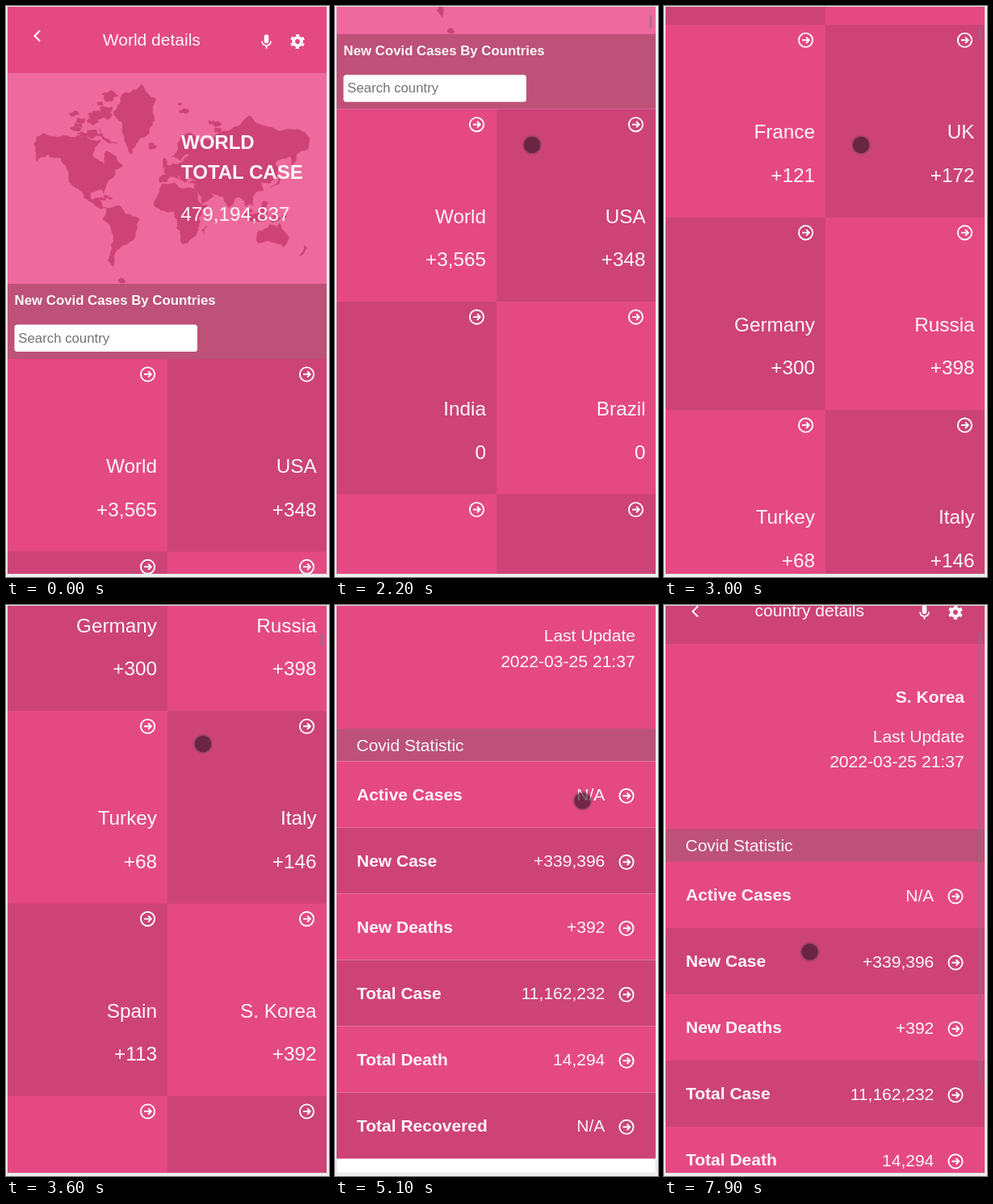
These frames come from a looping animation (400x707 px, 8 s). An HTML page:

```html
<!DOCTYPE html>
<html lang="en">
<head>
<meta charset="utf-8">
<title>Covid statistics app</title>
<style>
  html, body { margin: 0; width: 100%; height: 100%; overflow: hidden; background: #f0f0f0; }
  svg { display: block; width: 400px; height: 707px; }
  text { font-family: "Liberation Sans", Arial, sans-serif; fill: #fff; fill-opacity: .95; white-space: pre; }
  .b { font-weight: bold; }
</style>
</head>
<body>
<svg id="stage" viewBox="0 0 400 707"></svg>
<script>
const BRIGHT = '#e44982', DARK = '#cd4376', SEA = '#ee6a9c', BAND = '#bd5177';

// A few "lon lat" corners per land; the coast between them is roughened.
const LAND = {
  northAmerica: `-168 66,-156 71,-128 70,-95 68,-84 68,-94 59,-82 55,-79 52,-77 62,-65 59,-56 52,-66 49,-65 45,-76 36,
    -80 26,-84 30,-97 27,-96 18,-87 21,-83 10,-77 8,-97 16,-105 20,-117 33,-124 40,-125 48,-135 58,-150 60,-164 55,-165 61`,
  greenland: '-68 78,-55 82,-33 83.5,-14 81,-22 71,-40 65,-45 60,-53 67,-57 75',
  baffin: '-85 73,-63 66,-76 67',
  southAmerica: '-77 8,-62 11,-50 0,-35 -6,-40 -21,-57 -37,-67 -47,-68 -55,-75 -50,-71 -18,-81 -5',
  africa: '-6 36,10 37,20 31,33 31,43 12,51 12,40 -4,40 -15,31 -29,19 -35,12 -17,9 4,-8 5,-17 14,-10 30',
  madagascar: '50 -14,47 -25,44 -20',
  europe: `-9 37,-9 43,-1 45,-4 48.5,8 54,20 55,29 60,21 61,25 65,17 56,6 59,14 67,26 71,41 67,46 68,46 42,28 42,
    22 37,13 45,16 39,4 43,0 38`,
  britain: '-5 50,1 52,-4 58',
  asia: `45 68,72 72,104 77,140 72,180 69,177 63,163 60,157 51,155 59,137 54,140 48,129 36,119 38,122 30,108 21,109 11,
    101 12,103 2,98 16,88 21,78 8,72 20,57 26,50 29,59 22,44 13,35 29,36 36,27 37,41 42`,
  japan: '131 32,141 36,143 44',
  australia: '114 -22,130 -12,139 -17,142 -11,153 -26,147 -38,138 -34,130 -32,115 -34',
  newZealand: '173 -36,177 -39,167 -46'
};

const CARDS = [
  ['World', '+3,565'], ['USA', '+348'], ['India', '0'], ['Brazil', '0'],
  ['France', '+121'], ['UK', '+172'], ['Germany', '+300'], ['Russia', '+398'],
  ['Turkey', '+68'], ['Italy', '+146'], ['Spain', '+113'], ['S. Korea', '+392'],
  ['Argentina', '0'], ['Vietnam', '0'], ['', ''], ['', '']
];
const STATS = [
  ['Active Cases', 'N/A'], ['New Case', '+339,396'], ['New Deaths', '+392'],
  ['Total Case', '11,162,232'], ['Total Death', '14,294'], ['Total Recovered', 'N/A']
];

// Eased moves: start ms, duration ms, then how far to scroll or where to point.
const LIST_FLICKS = [[1200, 500, 235.3], [1990, 560, 233.9], [2700, 530, 704], [3400, 600, 332.4]];
const DETAIL_FLICKS = [[7600, 300, -124.5]];
const POINTER_MOVES = [
  [500, 0, 44, 104], [500, 200, 316, 138], [700, 200, 244, 172],
  [3900, 200, 284, 238], [4100, 200, 303, 246],
  [5000, 200, 310, 239], [5200, 300, 284, 292], [5700, 200, 264, 207],
  [6000, 200, 385, 200], [6200, 300, 223, 163], [6500, 100, 147, 166], [6600, 200, 247, 178],
  [7100, 400, 180.5, 429.5]
];

const clamp = v => Math.min(1, Math.max(0, v));
const ease = k => k * k * (3 - 2 * k);

let seed = 7;
const random = () => (seed = seed * 16807 % 2147483647) / 2147483647;

const rect = (x, y, w, h, fill, more = '') => `<rect x="${x}" y="${y}" width="${w}" height="${h}" fill="${fill}" ${more}/>`;
const text = (x, y, size, str, anchor = 'start', cls = '') =>
  `<text x="${x}" y="${y}" font-size="${size}" text-anchor="${anchor}" class="${cls}">${str}</text>`;
const line = (d, w = 2) => `<path d="${d}" fill="none" stroke="#fff" stroke-width="${w}"/>`;
const arrow = (x, y) => `<g transform="translate(${x} ${y})">
  <circle r="8.6" fill="none" stroke="#fff" stroke-width="1.9"/>${line('M-4.5 0H4M.6 -3.7L4.3 0L.6 3.7', 1.9)}</g>`;

const project = (lon, lat) => [199.5 + .98 * lon, 258 - 56.2 * Math.asinh(Math.tan(lat * Math.PI / 180))];

// Midpoint displacement between two points; returns the points after a.
function coast(a, b) {
  const dx = b[0] - a[0], dy = b[1] - a[1];
  if (Math.hypot(dx, dy) < 4) return [b];
  const k = (random() - .5) * .36;
  const mid = [(a[0] + b[0]) / 2 - dy * k, (a[1] + b[1]) / 2 + dx * k];
  return [...coast(a, mid), ...coast(mid, b)];
}
const outline = pts => 'M' + pts.flatMap((p, i) => coast(p, pts[(i + 1) % pts.length]))
  .map(p => p.map(v => v.toFixed(1)).join(' ')).join('L') + 'Z';
const parse = shape => shape.split(',').map(pair => project(...pair.trim().split(' ').map(Number)));

// Small islands spread over a box of longitudes and latitudes.
function islands(count, west, east, south, north, size) {
  return Array.from({ length: count }, () => {
    const [x, y] = project(west + random() * (east - west), south + random() * (north - south));
    const r = size * (.5 + random()), turn = random() * 6;
    return outline([0, 1, 2, 3].map(i => [x + r * 1.4 * Math.cos(turn + i * 1.57), y + r * .8 * Math.sin(turn + i * 1.57)]));
  }).join('');
}

function worldMap() {
  const d = Object.values(LAND).map(shape => outline(parse(shape))).join('') +
    islands(16, -118, -82, 69.5, 78, 4) + islands(9, -90, -68, 77, 82, 6) +
    islands(12, 98, 123, -7, 5, 4) + islands(5, 120, 125, 7, 17, 2) + islands(5, 132, 148, -8, -2, 4) +
    islands(4, -84, -70, 18.5, 22, 2) + islands(3, -22, -16, 64, 66, 3) + islands(4, 13, 24, 77, 80, 3) +
    islands(4, 54, 64, 72, 76, 3) + islands(2, -62, -56, -64, -63, 3);
  return rect(0, 83, 400, 262, SEA) +
    `<path d="${d}" fill="${DARK}" stroke="${DARK}" stroke-width=".6" stroke-linejoin="round"/>`;
}

function header(title, fill, backY) {
  return rect(0, 0, 400, 83, fill) + line(`M42 ${backY - 6.5}L35.5 ${backY}L42 ${backY + 6.5}`) +
    text(180.3, 49, 21, title, 'middle') +
    `<path transform="translate(322.5 44) scale(.93) translate(-12 -11.5)" fill="#fff" d="M12 14a3 3 0 0 0 3-3V5a3 3 0 0 0-6 0v6a3 3 0 0 0 3 3zm5-3a5 5 0 0 1-10 0H5.3a6.7 6.7 0 0 0 5.7 6.7V21h2v-3.3a6.7 6.7 0 0 0 5.7-6.7z"/>
    <g transform="translate(361 44) rotate(30)" fill="none" stroke="#fff"><circle r="4.9" stroke-width="3.8"/>
    <circle r="7.6" stroke-width="2.8" stroke-dasharray="3.98" stroke-dashoffset="1.99"/></g>`;
}

function listPage() {
  const cards = CARDS.map(([name, count], i) => {
    const row = i >> 1, col = i & 1, top = 437 + row * 238.4, right = col ? 384.6 : 187;
    return rect(col * 200, top, 200, 239, (row + col) % 2 ? DARK : BRIGHT) +
      arrow(col ? 372.5 : 175.5, top + 19) +
      text(right, top + 141, 24.3, name, 'end') + text(right, top + 194.5, 24.3, count, 'end');
  });
  return worldMap() + header('World details', BRIGHT, 37) +
    text(217, 177, 24, 'WORLD', 'start', 'b') + text(217, 214, 24, 'TOTAL CASE', 'start', 'b') +
    text(216.3, 266, 24.3, '479,194,837') +
    rect(0, 344, 400, 93, BAND) + text(10.6, 370, 16.8, 'New Covid Cases By Countries', 'start', 'b') +
    rect(10.5, 394.5, 226.5, 33.5, '#fff', 'rx="3.5"') +
    text(15.3, 416.5, 16.8, '<tspan fill="#6c6c6c">Search country</tspan>') + cards.join('');
}

function detailPage() {
  const rows = STATS.map(([label, value], i) => {
    const top = 353 + i * 82;
    return rect(0, top, 400, 82, i % 2 ? DARK : BRIGHT) + text(27, top + 48, 21, label, 'start', 'b') +
      text(334.3, top + 48.7, 21, value, 'end') + arrow(361, top + 42.8);
  });
  return rect(0, 0, 400, 870, '#fff') + rect(0, 83, 400, 230, BRIGHT) + header('country details', DARK, 43) +
    text(372, 156, 21, 'S. Korea', 'end', 'b') + text(372, 204.5, 21, 'Last Update', 'end') +
    text(371.7, 236, 21.1, '2022-03-25 21:37', 'end') +
    rect(0, 312.5, 400, 40.5, BAND) + text(26.5, 340, 21, 'Covid Statistic') + rows.join('');
}

const stage = document.getElementById('stage');
stage.innerHTML = `<clipPath id="screen">${rect(2, 1, 395, 702, '#000')}</clipPath>
  ${rect(1, 0, 397, 704, '#dedede')}
  <g clip-path="url(#screen)">
    <g id="list">${listPage()}</g><g id="detail">${detailPage()}</g>
    ${rect(389.5, 0, 3, 16, '#8a7286', 'id="bar" rx="1.5" fill-opacity=".6"')}
    <g id="pointer"><circle r="11.2" fill="none" stroke="#6b4a5c" stroke-opacity=".45" stroke-width="1.6"/>
    <circle r="10.3" fill="#2d1423" fill-opacity=".62"/></g>
  </g>`;
const [list, detail, bar, pointer] = ['list', 'detail', 'bar', 'pointer'].map(id => document.getElementById(id));

const scrolled = (flicks, t) => flicks.reduce((sum, [start, span, dist]) => sum + dist * ease(clamp((t - start) / span)), 0);

function pointAt(t) {
  let x = 0, y = 0;
  for (const [start, span, toX, toY] of POINTER_MOVES) {
    if (t < start) break;
    const k = span ? ease(clamp((t - start) / span)) : 1;
    x += (toX - x) * k;
    y += (toY - y) * k;
  }
  return [x, y];
}
const show = (el, on) => el.setAttribute('visibility', on ? 'visible' : 'hidden');
const move = (el, x, y) => el.setAttribute('transform', `translate(${x} ${y})`);

function draw() {
  const t = Math.floor(performance.now() % 8000 / 100) * 100;
  const onDetail = t >= 4800;
  const scroll = onDetail ? 159.5 + scrolled(DETAIL_FLICKS, t) : scrolled(LIST_FLICKS, t);
  show(list, !onDetail);
  show(detail, onDetail);
  move(onDetail ? detail : list, 0, -scroll);
  bar.setAttribute('y', 4 + scroll * (onDetail ? .81 : .0245));
  bar.setAttribute('height', onDetail ? 558 : 16);
  bar.setAttribute('opacity', onDetail ? +(t >= 7700) : (t >= 1300) * clamp((4500 - t) / 200));
  show(pointer, t >= 500);
  move(pointer, ...pointAt(t));
  requestAnimationFrame(draw);
}
draw();
</script>
</body>
</html>
```
